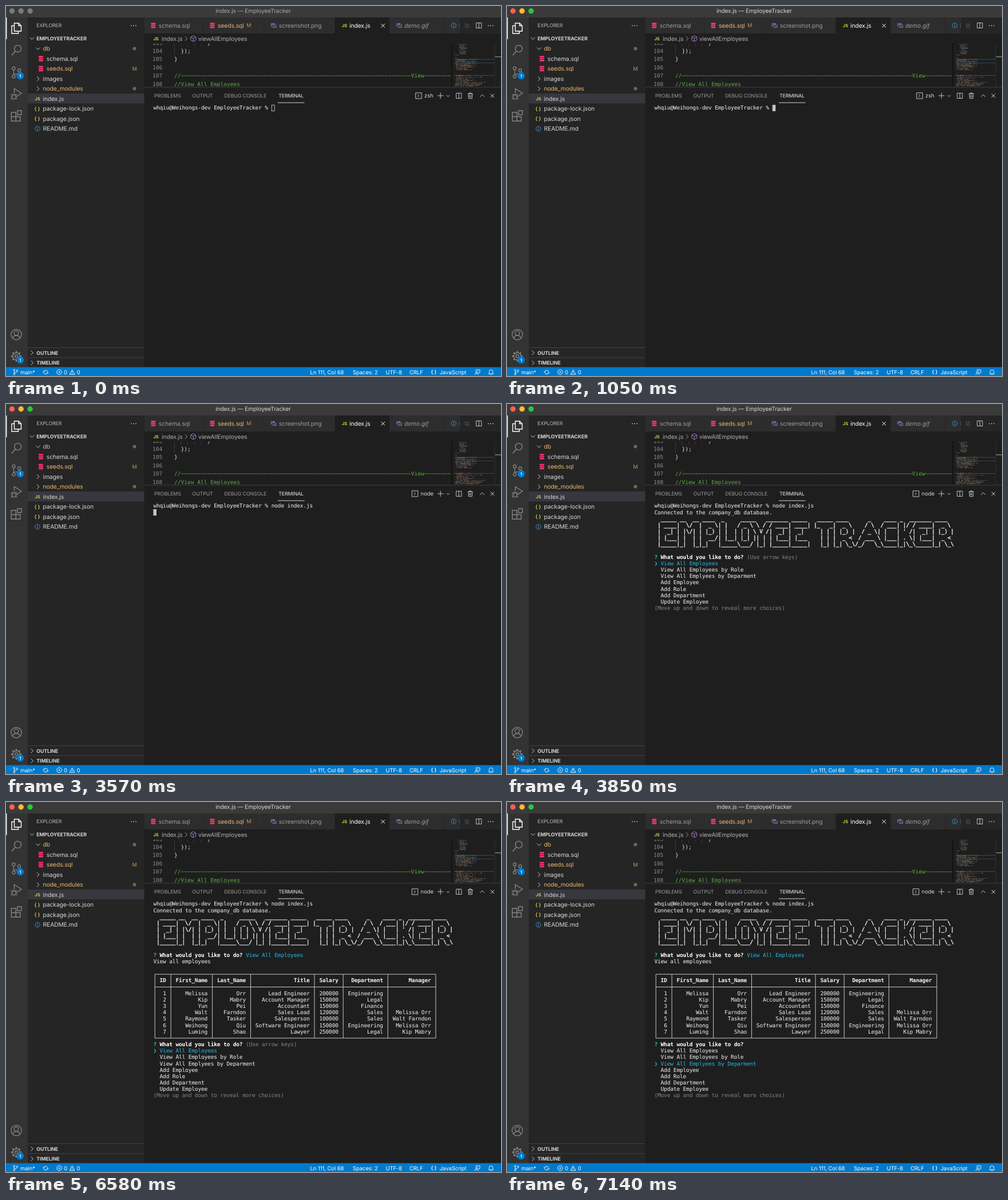
These frames come from a looping animation (865x647 px, 8000 ms). An HTML page:

```html
<!DOCTYPE html>
<html lang="en">
<head>
<meta charset="utf-8">
<title>Employee tracker session</title>
<style>
html, body { margin: 0; width: 100%; height: 100%; overflow: hidden; background: #1e1e1e; }
svg { display: block; width: 100vw; height: 100vh; }
text { font-family: Inter, "Open Sans", sans-serif; white-space: pre; text-rendering: geometricPrecision; }
.ui text { letter-spacing: -.01em; }
.code text, .term text { font-family: "DejaVu Sans Mono", monospace; font-size: 9.56px; }
.ui .code text { letter-spacing: 0; }
.term text { letter-spacing: -.178px; }
.banner text { stroke: #f2f2f2; stroke-width: .4px; }
</style>
</head>
<body>
<svg id="stage" viewBox="0 0 865 647"></svg>
<script>
const LOOP = 8000;
const FG = '#d6d6d6', DIM = '#858585', GOLD = '#ebb76c', YELLOW = '#d2d040', BLUE = '#3a9fd4',
      PURPLE = '#9068b0', PINK = '#f0346b', CYAN = '#22b8e0', GREEN = '#1fcb85', TERM = '#f2f2f2',
      NOTE = '#58b044', HINT = '#858585';

const esc = s => s.replace(/&/g, '&amp;').replace(/</g, '&lt;');
const text = (x, y, s, fill = FG, size = 10.35, more = '') =>
  `<text x="${x}" y="${y}" fill="${fill}" font-size="${size}" ${more}>${esc(s)}</text>`;
const rect = (x, y, w, h, fill, more = '') =>
  `<rect x="${x}" y="${y}" width="${w}" height="${h}" fill="${fill}" ${more}/>`;
const line = (d, stroke = FG, w = .9) =>
  `<path d="${d}" fill="none" stroke="${stroke}" stroke-width="${w}"/>`;
const disc = (x, y, r, fill) => `<circle cx="${x}" cy="${y}" r="${r}" fill="${fill}"/>`;
const ring = (x, y, r, stroke, w = .9) =>
  `<circle cx="${x}" cy="${y}" r="${r}" fill="none" stroke="${stroke}" stroke-width="${w}"/>`;
const during = (from, to, body) => `<g data-from="${from}" data-to="${to}">${body}</g>`;
const BOLD = 'font-weight="700"', MID = 'text-anchor="middle"';

// Small icons, placed by their centre
const right = (x, y, c) => line(`M${x - 2} ${y - 3.8}l4 3.8l-4 3.8`, c);
const down = (x, y, c, s = 3.6) => line(`M${x - s} ${y - s / 2}l${s} ${s}l${s} ${-s}`, c);
const cross = (x, y, c = FG) => line(`M${x - 3.2} ${y - 3.2}l6.4 6.4m0 -6.4l-6.4 6.4`, c, 1);
const dots = (x, y) => [-4, 0, 4].map(d => disc(x + d, y, .85, FG)).join('');
const split = (x, y) => line(`M${x - 4.6} ${y - 4.5}h9.2v9h-9.2zm4.6 0v9`);
const info = (x, y) => ring(x, y, 4.2, BLUE) + line(`M${x} ${y - 2.4}v1.1m0 1v2.7`, BLUE, 1.1);
const js = (x, y) => text(x, y + 3, 'JS', YELLOW, 7.6, BOLD);
const braces = (x, y, c = YELLOW) => text(x, y + 3, '{ }', c, 8.6, 'font-weight="600"');
const base = (x, y) => [-3.4, 0, 3.4].map(d => rect(x - 4.1, y + d - 1.4, 8.2, 2.7, PINK, 'rx="1.1"')).join('');
const image = (x, y) => rect(x - 4.6, y - 3.8, 7, 5.4, PURPLE) +
  line(`M${x - 2} ${y + 3.3}h6.4v-4.8`, PURPLE, 1.2) + disc(x - 2.6, y - 2, .9, '#2d2d2d') +
  `<path d="M${x - 3.8} ${y + 1}l2.2 -2l1 .9l1.4 -1.6l1.3 2.7z" fill="#2d2d2d"/>`;
const badge = (x, y) => disc(x, y, 6.4, '#007acc') + text(x, y + 2.6, '1', '#fff', 7.2, MID + ' ' + BOLD);

function titleBar() {
  const lights = (...c) => c.map((f, i) => disc(10.4 + i * 15.85, 8.8, 4.7, f)).join('');
  const title = c => text(432, 12.2, 'index.js — EmployeeTracker', c, 10.1, MID);
  return rect(0, 0, 865, 20, '#3a3a3a') +
    during(0, 1050, lights('#7b7b7b', '#7b7b7b', '#7b7b7b') + title('#a8a8a8')) +
    during(1050, LOOP, lights('#ff5f57', '#febc2e', '#28c840') + title(FG));
}

function activityBar() {
  const teeth = [...Array(8)].map((_, i) => {
    const a = i * Math.PI / 4, c = Math.cos(a), s = Math.sin(a);
    return `M${18 + 6 * c} ${612.5 + 6 * s}L${18 + 9.2 * c} ${612.5 + 9.2 * s}`;
  }).join('');
  return rect(0, 20, 38, 612, '#333') + rect(0, 20, 1.4, 38, '#fff') +
    line('M14.5 30h7.5l4.5 4.5v9.5h-12zM22 30v4.5h4.5M14.5 34.5h-4.5v13.5h11.5v-4', '#fff', 1.4) +
    ring(20.6, 74.6, 6, DIM, 1.4) + line('M16.3 79L10 86.2', DIM, 1.6) +
    ring(13.5, 109, 2.6, DIM, 1.3) + ring(23, 112.5, 2.6, DIM, 1.3) + ring(13.5, 123.3, 2.6, DIM, 1.3) +
    line('M13.5 111.6v9M23 115.2q0 3.5 -5 3.5q-4.5 0 -4.5 2', DIM, 1.3) + badge(24.8, 122) +
    line('M14.5 152v-7.5l12.5 8l-8.5 6', DIM, 1.4) +
    line('M11 157a3 3 0 0 1 6 0v3a3 3 0 0 1 -6 0zM11 156h6M8.4 154.5l2.6 2M19.6 154.5l-2.6 2M8 159h3M17 159h3M8.5 163l2.5 -1.8M19.5 163l-2.5 -1.8', DIM, 1.1) +
    line('M9.3 186h8v15.3h-8zM9.3 193.5h15.5v7.8h-15.5M20 183h7v7h-7z', DIM, 1.4) +
    ring(18, 574.5, 9.2, DIM, 1.3) + ring(18, 572, 3.8, DIM, 1.3) + line('M11.8 581q1 -5 6.2 -5t6.2 5', DIM, 1.3) +
    ring(18, 612.5, 6.3, DIM, 1.4) + ring(18, 612.5, 2.5, DIM, 1.3) + line(teeth, DIM, 2.4) + badge(24.8, 619);
}

function sideBar() {
  const name = (i, x, s, c) => text(x, 78.1 + i * 17.53, s, c);
  const mid = i => 74.5 + i * 17.53;
  const section = (y, s) => right(45.5, y, FG) + text(53.3, y + 3.2, s, FG, 8.75, BOLD);
  return rect(38, 20, 203.5, 612, '#252526') + text(53.3, 37.2, 'EXPLORER', '#bbb', 8.75) + dots(223, 34.3) +
    down(45.3, 56.6, FG) + text(53.3, 59.8, 'EMPLOYEETRACKER', FG, 8.75, BOLD) +
    rect(38, 153, 203.5, 17.5, '#37373d') +
    down(56, mid(0), FG) + name(0, 64.5, 'db', GOLD) + disc(224.5, mid(0), 3, '#756550') +
    base(61, mid(1)) + name(1, 70.8, 'schema.sql') +
    base(61, mid(2)) + name(2, 70.8, 'seeds.sql', GOLD) + text(224.5, 112.8, 'M', '#c0985a', 9.2, MID) +
    right(56, mid(3), FG) + name(3, 64.5, 'images') +
    right(56, mid(4), FG) + name(4, 64.5, 'node_modules', GOLD) + disc(224.5, mid(4), 3, '#756550') +
    js(50.3, mid(5)) + name(5, 64.5, 'index.js') +
    braces(49.5, mid(6)) + name(6, 64.5, 'package-lock.json') +
    braces(49.5, mid(7)) + name(7, 64.5, 'package.json') +
    info(55, mid(8)) + name(8, 64.5, 'README.md') +
    rect(38, 597, 203.5, .8, '#4a4a4b') + section(606.4, 'OUTLINE') +
    rect(38, 614.4, 203.5, .8, '#4a4a4b') + section(623.9, 'TIMELINE');
}

function miniMap() {
  let seed = 7, out = '';
  const rnd = () => (seed = seed * 16807 % 2147483647) / 2147483647;
  const tones = ['#8a5d47', '#6e6e6e', '#4c6f86', '#8a5d47', '#77704f'];
  for (let y = 66.5; y < 140; y += 1.55) {
    const top = y < 84, gap = y > 84 && y < 92 || y > 112 && y < 120;
    const x = top ? 790 + rnd() * 5 : 784 + rnd() * 4;
    const end = x + (top ? 5 + rnd() * 8 : 12 + rnd() * 40);
    if (gap && rnd() < .8) continue;
    for (let p = x; p < (gap ? x + 3 : end); p += 1 + rnd() * 4)
      out += rect(p.toFixed(1), y.toFixed(1), (.8 + rnd() * 3).toFixed(1), .8, tones[rnd() * 5 | 0]);
  }
  const rule = y => `<path d="M784 ${y}H853" stroke="#4b7a3e" stroke-width=".8" stroke-dasharray="1.2 .4"/>`;
  return out + rule(93.3) + rule(121.5) + rect(784, 99, 69, .9, '#2b4a60');
}

function editor() {
  const row = (n, s, c = '#dcdcdc') => {
    const y = 81.9 + (n - 104) * 14.4;
    return text(256, y, '' + n, '#8c8c8c') + text(294, y, s, c);
  };
  const rule = n => '−'.repeat(n);
  const guides = [0, 2, 4, 6, 8].map(c => `M${294.5 + c * 5.757} 66v5.2`).join('') + 'M294.5 71v14.4';
  const code = row(103, ' '.repeat(10) + '}') + row(104, '  });') + row(105, '}') + row(106, '') +
    row(107, '//' + rule(70) + 'View' + rule(9), NOTE) + row(108, '//View All Employees', NOTE);
  const tab = (x, w, fill = '#2d2d2d') => rect(x, 20, w - .8, 28, fill);
  return rect(241.5, 48, 624, 94, '#1e1e1e') + line(guides, '#404040', .8) + `<g class="code">${code}</g>` +
    rect(779, 66, 86, 76, '#1e1e1e') + rect(778, 66, 1.6, 76, '#111') + miniMap() +
    rect(853.6, 66, .7, 76, '#3a3a3a') + rect(854.5, 88.3, 10.5, 1.1, '#a0a0a0') +
    rect(241.5, 20, 624, 28, '#252526') +
    tab(241.5, 103.3) + base(257.3, 34) + text(266.8, 37.6, 'schema.sql', '#9c9c9c') +
    tab(344.8, 106.2) + base(360.5, 34) + text(370, 37.6, 'seeds.sql', GOLD) + text(420.3, 37.3, 'M', '#c0985a', 9.2) +
    tab(451, 124) + image(467.5, 34) + text(476.8, 37.6, 'screenshot.png', '#9c9c9c') +
    tab(575, 95.5, '#1e1e1e') + js(586.8, 34) + text(600, 37.6, 'index.js', '#fff') + cross(658.8, 34.3, '#fff') +
    tab(670.5, 95.5) + image(687, 34) + text(696, 37.6, 'demo.gif', '#9c9c9c', 10.35, 'font-style="italic"') +
    tab(766, 27.8) + info(782.3, 34) + rect(792.4, 30, 1, 8, '#2f7096') + rect(793.4, 20, 72, 28, '#252526') +
    line('M802.5 30v6.5h4M804.5 34.5l2 2l-2 2M808.5 39v-7h-4M806.5 30l-2 2l2 2', '#555') +
    split(826.3, 34) + dots(846.8, 34.3) +
    rect(241.5, 48, 624, 17.6, '#1e1e1e') + js(257.5, 57) + text(272, 60.5, 'index.js', '#b0b0b0') +
    right(314.8, 57, '#a9a9a9') + line('M327.3 51.8l4.5 2.5v5.2l-4.5 2.5l-4.5 -2.5v-5.2zM322.8 54.3l4.5 2.4l4.5 -2.4M327.3 56.7v5.3', '#b180d7') +
    text(336, 60.5, 'viewAllEmployees', '#b0b0b0');
}

function panel() {
  const tab = (x, s, c = '#9c9c9c') => text(x, 160.3, s, c, 8.75);
  const shell = (x, s) => line(`M${x} 151.8h10.4v10.2h-10.4zm3.4 2.6l2.6 2.5l-2.6 2.5`) + text(x + 15.2, 160.2, s, FG, 9.56);
  return rect(241.5, 141.6, 624, 490.4, '#1e1e1e') + rect(241.5, 141.6, 624, .8, '#484848') +
    tab(259, 'PROBLEMS') + tab(325.6, 'OUTPUT') + tab(381.3, 'DEBUG CONSOLE') + tab(476.3, 'TERMINAL', '#f0f0f0') +
    rect(475, 168.6, 46.5, .9, '#e7e7e7') +
    during(0, 3570, shell(715.8, 'zsh')) + during(3570, LOOP, shell(709.4, 'node')) +
    line('M754 156.9h10.4m-5.2 -5.2v10.4') + down(772.4, 157.3, FG, 2.6) + split(791.3, 156.9) +
    line('M806.8 153.5h9m-6 0v-1.6h3v1.6m-4.8 0l.4 8.2h6l.4 -8.2m-4.6 2v4.4m2 -4.4v4.4') +
    line('M828.4 158.8l3.8 -3.8l3.8 3.8') + cross(849.9, 156.9);
}

// Terminal grid
const CELL = 5.577, ROW = 11.165, LEFT = 257.4;
const colX = c => LEFT + c * CELL, rowY = r => 178 + r * ROW;
const put = (r, c, s, fill = TERM, more = '') => text(colX(c), rowY(r) + 3.4, s, fill, 9.56, more);
const cursor = (r, c) => rect(colX(c), rowY(r) - 5.2, CELL, 11.1, '#c4c4c4');

const BANNER = String.raw`
  _____ __  __ ____  _     _____   _______ _____   _____ ____      _    ____ _  _______ ____
 | ____|  \/  |  _ \| |   / _ \ \ / / ____| ____| |_   _|  _ \    / \  / ___| |/ / ____|  _ \
 |  _| | |\/| | |_) | |  | | | \ V /|  _| |  _|     | | | |_) |  / _ \| |   | ' /|  _| | |_) |
 | |___| |  | |  __/| |__| |_| || | | |___| |___    | | |  _ <  / ___ \ |___| . \| |___|  _ <
 |_____|_|  |_|_|   |_____\___/ |_| |_____|_____|   |_| |_| \_\/_/   \_\____|_|\_\_____|_| \_\
`.split('\n').slice(1, 6);

const CHOICES = ['View All Employees', 'View All Employees by Role', 'View All Emplyees by Deparment',
  'Add Employee', 'Add Role', 'Add Department', 'Update Employee'];

const STAFF = `ID,First_Name,Last_Name,Title,Salary,Department,Manager
1,Melissa,Orr,Lead Engineer,200000,Engineering,
2,Kip,Mabry,Account Manager,150000,Legal,
3,Yun,Pei,Accountant,150000,Finance,
4,Walt,Farndon,Sales Lead,120000,Sales,Melissa Orr
5,Raymond,Tasker,Salesperson,100000,Sales,Walt Farndon
6,Weihong,Qiu,Software Engineer,150000,Engineering,Melissa Orr
7,Luming,Shao,Lawyer,250000,Legal,Kip Mabry`.split('\n').map(l => l.split(','));

const question = r => put(r, 0, '?', GREEN, BOLD) + put(r, 2, 'What would you like to do?', '#fff', BOLD);

function menu(r, pick, hint) {
  return question(r) + (hint ? put(r, 29, '(Use arrow keys)', HINT) : '') +
    CHOICES.map((s, i) => put(r + 1 + i, 2, s, i === pick ? CYAN : TERM)).join('') +
    put(r + 1 + pick, 0, '❯', CYAN) + put(r + 8, 0, '(Move up and down to reveal more choices)', HINT);
}

function table(r) {
  const bars = [0, 5, 18, 30, 50, 59, 73, 88], x = c => colX(c + .5).toFixed(1);
  const y = d => (rowY(r + d) + .4).toFixed(1);
  const rules = [0, 2, 10].map(d => `M${x(0)} ${y(d)}H${x(88)}`);
  const walls = bars.map(c => `M${x(c)} ${y(0)}V${y(10)}`);
  const cells = STAFF.map((row, i) => row.map((s, j) =>
    put(r + (i ? i + 2 : 1), bars[j + 1] - 1 - s.length, s, TERM, i ? '' : BOLD)).join(''));
  return line(rules.join('') + walls.join(''), '#d0d0d0', .95) + cells.join('');
}

function terminal() {
  return put(0, 0, 'whqiu@Weihongs-dev EmployeeTracker % ') +
    during(0, 1050, rect(colX(37) + .5, 173.2, CELL - .6, 10.4, 'none', 'stroke="#c4c4c4" stroke-width=".9"')) +
    during(1050, 2310, cursor(0, 37)) +
    during(2310, LOOP, put(0, 37, 'node index.js')) +
    during(2310, 3360, cursor(0, 50)) +
    during(3360, 3780, cursor(1, 0)) +
    during(3780, LOOP, put(1, 0, 'Connected to the company_db database.') +
      `<g class="banner">${BANNER.map((s, i) => put(2 + i, 0, s)).join('')}</g>`) +
    during(3850, 5180, menu(8, 0, true)) +
    during(5180, LOOP, question(8) + put(8, 29, 'View All Employees', CYAN) + put(9, 0, 'View all employees') + table(11)) +
    during(5180, 6720, menu(22, 0, true)) +
    during(6720, 7140, menu(22, 1, false)) +
    during(7140, LOOP, menu(22, 2, false));
}

function statusBar() {
  const label = (x, s) => text(x, 643.6, s, '#fff', 9.5);
  const W = '#fff';
  return rect(0, 631.5, 865, 15.5, '#007acc') +
    ring(14.3, 636.6, 1.3, W) + ring(14.3, 643.8, 1.3, W) + ring(19.4, 637.6, 1.3, W) +
    line('M14.3 638v4.4M19.4 639q0 2 -5 2.4', W) + label(25, 'main*') +
    line('M65.8 639.5a3.7 3.7 0 0 1 7 0M72.8 641.2a3.7 3.7 0 0 1 -7 0M64 638.8l1.8 1.6l1.8 -1.6M71 642l1.8 -1.6l1.8 1.6', W) +
    ring(93, 640.3, 4.3, W) + line('M91.4 638.7l3.2 3.2m0 -3.2l-3.2 3.2', W) + label(101, '0') +
    line('M115.6 636.2l4.4 8h-8.8zm0 2.8v2.4m0 .8v1', W) + label(123.8, '0') +
    label(531.6, 'Ln 111, Col 68') + label(606, 'Spaces: 2') + label(663.5, 'UTF-8') + label(705, 'CRLF') +
    braces(742.6, 640.3, W) + label(757.8, 'JavaScript') +
    ring(822.3, 639.8, 1.6, W) + line('M819.3 645q0 -3 3 -3t3 3M820.5 636.2h7.5v5h-2l-1.2 1.4', W) +
    line('M843.3 643.2h8.4l-1 -1.6v-2.2a3.2 3.2 0 0 0 -6.4 0v2.2zM846.4 643.4a1.1 1.1 0 0 0 2.2 0', W);
}

const stage = document.getElementById('stage');
stage.innerHTML = `<g class="ui">${editor()}${panel()}${titleBar()}${activityBar()}${sideBar()}${statusBar()}</g>` +
  `<g class="term">${terminal()}</g>`;
const timed = [...stage.querySelectorAll('[data-from]')];

function show(now) {
  const t = now % LOOP;
  for (const g of timed) g.style.display = t >= +g.dataset.from && t < +g.dataset.to ? '' : 'none';
  requestAnimationFrame(show);
}
show(0);
</script>
</body>
</html>
```
